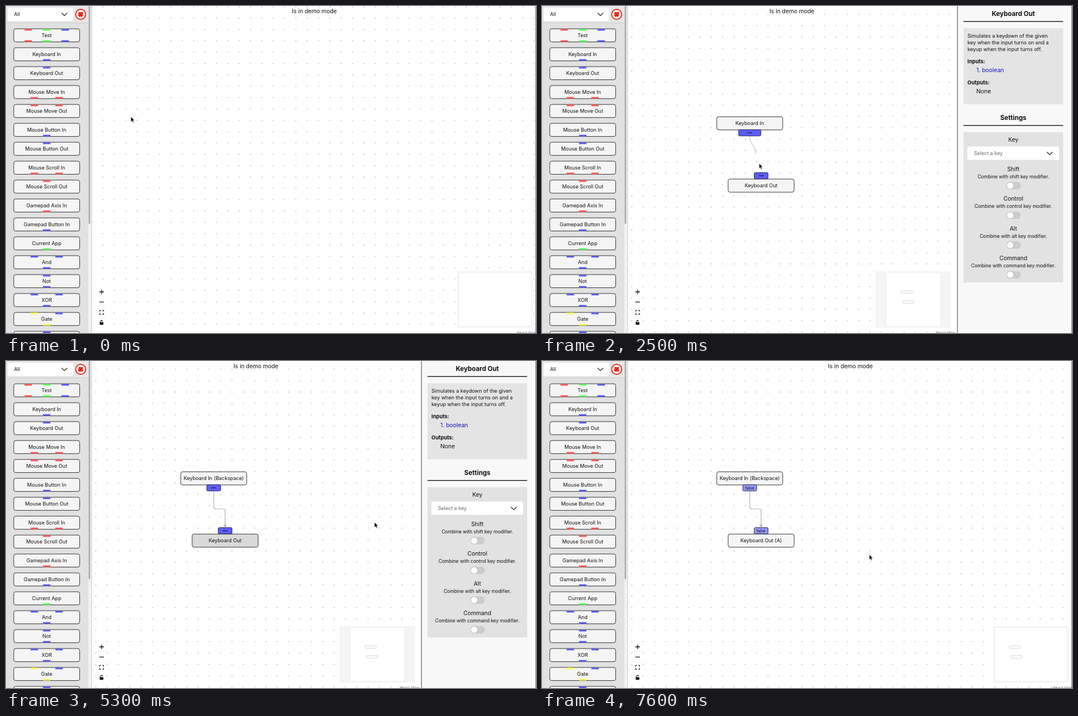
Recreate the animation shown at these times as an HTML page. Size 953x588 px, loop 7.7 s.

```html
<!DOCTYPE html>
<html lang="en">
<head>
<meta charset="utf-8">
<title>Node editor demo</title>
<style>
html, body { margin: 0; width: 100%; height: 100%; overflow: hidden; background: #fff; }
svg { display: block; width: 100%; height: 100%; font-family: Inter, "Open Sans", sans-serif; }
</style>
</head>
<body>
<svg id="stage" viewBox="0 0 953 588">
  <defs>
    <pattern id="dots" width="20.4" height="20.4" patternUnits="userSpaceOnUse">
      <circle cx="10.2" cy="10.2" r=".7" fill="#81818a"/>
    </pattern>
    <clipPath id="list"><rect x="765" y="282" width="165" height="245"/></clipPath>
  </defs>
  <g id="canvas"></g>
  <g id="sidebar"></g>
  <g id="panel"></g>
  <g id="pointer"></g>
</svg>
<script>
const LOOP = 7700, STEP = 100;
const layer = id => document.getElementById(id);
const COLORS = { r: '#fa5a5a', g: '#5aff5a', b: '#5a5aee', y: '#fafa50' };
const INK = '#333';

const rect = (x, y, w, h, fill, extra = '') =>
  `<rect x="${x}" y="${y}" width="${w}" height="${h}" fill="${fill}" ${extra}/>`;
const text = (s, x, y, size, { anchor = 'middle', weight = 400, fill = '#111' } = {}) =>
  `<text x="${x}" y="${y + size * 0.36}" font-size="${size}" text-anchor="${anchor}" font-weight="${weight}" fill="${fill}">${s}</text>`;
const left = (s, x, y, size, opts = {}) => text(s, x, y, size, { ...opts, anchor: 'start' });
const line = (d, stroke, width, extra = '') =>
  `<path d="${d}" fill="none" stroke="${stroke}" stroke-width="${width}" ${extra}/>`;
const chevron = (x, y) => line(`M${x - 5} ${y - 2.5}l5 5 5-5`, '#222', 1.2);

// Sidebar: label, top sockets, bottom sockets
const BLOCKS = [
  ['Test', 'rgb', 'rgb'], ['Keyboard In', '', 'b'], ['Keyboard Out', 'b', ''],
  ['Mouse Move In', '', 'rr'], ['Mouse Move Out', 'rr', ''],
  ['Mouse Button In', '', 'b'], ['Mouse Button Out', 'b', ''],
  ['Mouse Scroll In', '', 'rr'], ['Mouse Scroll Out', 'r', ''],
  ['Gamepad Axis In', '', 'r'], ['Gamepad Button In', '', 'b'],
  ['Current App', '', 'g'], ['And', 'bb', 'b'], ['Not', 'b', 'b'],
  ['XOR', 'bb', 'b'], ['Gate', 'yb', 'y'], ['', 'b', '']
];

const box = (label, x, y, fill = '#f5f5f5') =>
  rect(x - 59.3, y - 11.8, 118.6, 23.6, fill, `rx="3.5" stroke="${INK}"`) + text(label, x, y + 0.2, 9.15);

const sockets = (kinds, x, y) => [...kinds].map((k, i) =>
  rect(x - 73.2 + 133 * (i + 1) / (kinds.length + 1), y - 1.5, 13.4, 3, COLORS[k])).join('');

const block = ([label, top, bottom], x, y) =>
  box(label, x, y) + sockets(top, x, y - 10) + sockets(bottom, x, y + 10.3);

function drawSidebar() {
  layer('sidebar').innerHTML =
    rect(0, 0, 148, 588, '#e1e1e1') + rect(148, 0, 5.5, 588, '#f1f1f1') +
    line('M154 0V588', '#c4c4c4', 1) + rect(148.6, 0, 2.8, 392, '#a9a9a9', 'rx="1.4"') +
    BLOCKS.map((b, i) => block(b, 73.2, 52.8 + 34 * i)).join('') +
    rect(0, 0, 148, 30, '#e6e6e6') + line('M0 30.3H148', '#cfcfcf', 1) +
    rect(3, 3, 118, 24, '#fff', 'rx="3"') + left('All', 14.5, 15.2, 9.15) + chevron(105, 15) +
    `<circle cx="134.3" cy="15" r="9" fill="#fff" stroke="#ec2a1c" stroke-width="1.9"/>` +
    rect(130.2, 10.9, 8.2, 8.2, '#ec2a1c', 'rx="1"');
}

// Pointer tip: time, x, y
const PATH = [
  [0, 224.5, 199], [200, 120, 130], [300, 74, 89], [400, 150, 110], [600, 366, 177],
  [800, 190, 211], [1000, 95, 135], [1200, 74, 122], [1500, 76, 123], [1600, 125, 146],
  [1700, 230, 205], [1900, 386.5, 289], [2000, 400, 300], [2200, 407.5, 334],
  [2400, 374, 229], [2500, 390.5, 283], [2600, 394, 304], [2800, 394, 304],
  [3200, 376, 213], [3300, 374, 212], [3700, 835, 270], [3800, 857.5, 276],
  [3900, 857, 276], [4100, 825, 343], [4400, 825, 343], [4600, 709.5, 318],
  [4900, 404, 323], [5000, 404, 323], [5500, 835, 268], [5700, 840, 268],
  [5800, 804.5, 293], [5900, 804.5, 293], [6100, 588.5, 348], [LOOP, 588.5, 348]
];
const DRAGS = [[300, 600, 1], [1500, 1900, 2]];

function track(t) {
  const i = Math.max(1, PATH.findIndex(p => p[0] > t));
  const [t0, x0, y0] = PATH[i - 1], [t1, x1, y1] = PATH[i];
  const k = (t - t0) / (t1 - t0);
  return [x0 + (x1 - x0) * k, y0 + (y1 - y0) * k];
}
const between = (t, a, b) => t >= a && t < b;
const ramp = (t, a, b) => Math.min(1, Math.max(0, (t - a) / (b - a)));

function handle(x, y, width, value) {
  const label = value ? text(value, x, y, 7) : line(`M${x - 4.5} ${y}h9`, '#161640', 1.2);
  return rect(x - width / 2, y - 5.7, width, 11.4, value ? '#9696f4' : '#5d5dfa', 'rx="2.3" stroke="#2a2a55"') + label;
}

function controls() {
  const icons =
    line('M168 514h8M172 510v8M168 532.3h8', '#111', 1.3) +
    line('M168.5 549.5v-2.3h2.3M173.2 547.2h2.3v2.3M175.5 552.2v2.3h-2.3M170.8 554.5h-2.3v-2.3', '#111', 1.1) +
    rect(168.5, 568.5, 6.6, 4.8, '#111', 'rx=".8"') + line('M170 569v-1.8a1.8 1.8 0 0 1 3.6 0', '#111', 1.1);
  return rect(162.5, 505, 18.5, 73.5, '#fff') +
    [523, 541.5, 560].map(y => line(`M162.5 ${y}h18.5`, '#eee', 0.7)).join('') + icons;
}

function minimap(open, nodes, pan) {
  const x = open ? 600 : 811.5;
  const view = open ? [620, 96] : [815, 128];
  const dx = open ? 0 : 194.5;
  return rect(x, 477, 135.5, 101.5, '#f4f5f5') + rect(view[0], 480, view[1], 95, '#fff') +
    nodes.map(n => rect(644.2 + dx + (n.x - 366) * 0.165, 506.6 + (n.y - 177) * 0.16, 20, 4.4,
      '#fff', 'stroke="#d6d6d6" rx=".7"')).join('');
}

function drawCanvas(t, open) {
  const p = ramp(t, 2000, 2200), pan = [7.5 * p, 34 * p];
  const pattern = layer('dots');
  pattern.setAttribute('x', 164.2 + pan[0]);
  pattern.setAttribute('y', -8.8 + pan[1]);

  const source = { x: 366 + pan[0], y: 177 + pan[1] };
  const target = { x: 386.5 + pan[0], y: 289 + pan[1] };
  const nodes = [];
  let out = rect(154, 0, 799, 588, 'url(#dots)');
  const live = t >= 6900 && (between(t, 7200, 7300) || between(t, 7400, 7600) ? 'true' : 'false');

  if (between(t, 2400, 2600)) out += line(`M373.5 234C373.5 250 384 249 384 265.5`, '#b1b1b7', 1);
  if (t >= 2600) {
    out += line('M373.7 234V263q0 3 3 3H391q3 0 3 3V298', '#b1b1b7', 1.2) +
      '<path d="M390.8 294.5h6.4L394 299z" fill="#b1b1b7"/>';
  }
  if (t >= 600) {
    nodes.push(source);
    const label = t >= 4400 ? 'Keyboard In (Backspace)' : 'Keyboard In';
    out += box(label, source.x, source.y, between(t, 3300, 4900) ? '#d9d9d9' : undefined) +
      handle(source.x, source.y + 17, between(t, 2400, 2600) ? 40 : 25, live);
  }
  if (t >= 1900) {
    nodes.push(target);
    const label = t >= 5900 ? 'Keyboard Out (A)' : 'Keyboard Out';
    out += handle(target.x, target.y - 17.7, between(t, 2600, 2800) ? 40 : 25, live) +
      box(label, target.x, target.y, between(t, 4900, 6400) ? '#d9d9d9' : undefined);
  }
  out += text('Is in demo mode', open ? 449.3 : 554.6, 9.6, 10.3) +
    controls() + minimap(open, nodes) +
    left('React Flow', open ? 708 : 919, 587.4, 6.8, { fill: '#777' }) +
    line('M952.5 0V588', '#777', 1);
  layer('canvas').innerHTML = out;
}

const INFO = {
  in: {
    title: 'Keyboard In', inputs: 'None', outputs: '1. boolean',
    about: ['Output turns on when a given key', 'is pressed and turns off when the', 'key is released.']
  },
  out: {
    title: 'Keyboard Out', inputs: '1. boolean', outputs: 'None',
    about: ['Simulates a keydown of the given', 'key when the input turns on and a', 'keyup when the input turns off.']
  }
};
const OPTIONS = [...'abcdefghijklmnopqrstuvwxyz0123456789',
  'Backspace', 'Delete', 'Enter', 'Tab', 'Escape', 'Up', 'Down', 'Right', 'Left', 'Home', 'End'];

const port = s => left(s, 781, 0, 10.4, { fill: s === 'None' ? '#111' : '#1414c8' });
const at = (y, content) => `<g transform="translate(0 ${y})">${content}</g>`;

function toggle(name, y) {
  return text(name, 847.5, y, 10.3) +
    text(`Combine with ${name.toLowerCase()} key modifier.`, 847.5, y + 13.7, 8.5) +
    rect(834.5, y + 23, 26.5, 13.4, '#ccc', 'rx="6.7"') +
    `<circle cx="841.8" cy="${y + 29.7}" r="5.5" fill="#fff"/>`;
}

function dropdown(scroll, hoverY) {
  let rows = '';
  OPTIONS.forEach((name, i) => {
    const y = 294.7 + 25.1 * i - scroll;
    if (y < 265 || y > 545) return;
    if (Math.abs(hoverY - y) < 12.5) rows += rect(765, y - 12.5, 160, 25, '#deebf3');
    rows += left(name, 776, y + 0.3, 9.15) + line(`M765 ${y + 12.5}H924`, '#e8e8e8', 0.8);
  });
  return rect(765, 282, 165, 245, '#fff', 'stroke="#ddd" stroke-width=".7"') +
    `<g clip-path="url(#list)">${rows}</g>` +
    rect(925.8, 284 + scroll * 0.086, 3, 21.5, '#b8b8b8', 'rx="1.5"');
}

function drawPanel(t, open, hoverY) {
  if (!open) { layer('panel').innerHTML = ''; return; }
  const isIn = t < 1500 || between(t, 3300, 4900);
  const info = INFO[isIn ? 'in' : 'out'];
  const chosen = isIn ? (t >= 4400 && 'Backspace') : (t >= 5900 && 'a');
  const focus = between(t, 3800, 3900) || between(t, 5500, 5700);
  const bold = { weight: 700 };
  let out = rect(747, 0, 206, 588, '#f8f8f8') + line('M747 0V588', '#858585', 1.6) +
    line('M952.5 0V588', '#777', 1) +
    text(info.title, 847.5, 14, 11.6, bold) + line('M758 27.7H937', '#222', 1.5) +
    rect(758, 40, 179, 136.5, '#e4e4e4') +
    info.about.map((s, i) => left(s, 765, 53.3 + 12.2 * i, 9.15)).join('') +
    left('Inputs:', 765, 99.7, 9.4, bold) + at(114.8, port(info.inputs)) +
    left('Outputs:', 765, 137.8, 9.4, bold) + at(153, port(info.outputs)) +
    text('Settings', 847.5, 200.7, 11.6, bold) + line('M758 214.8H937', '#222', 1.5) +
    rect(758, 227, 179, isIn ? 344.5 : 270, '#e2e2e2') +
    text('Key', 847.5, 239.8, 10.3) +
    rect(765, 252.5, 165, 24.3, '#fff', `rx="2" ${focus ? 'stroke="#222"' : ''}`) +
    left(chosen || 'Select a key', 776.8, 264.8, 9, { fill: chosen ? '#111' : '#666' }) + chevron(913, 265);

  if (isIn) {
    const help = ['A keycode to listen for. If this is set, it', 'overrides the Key setting above. Press', 'a key to see its key code .'];
    out += text('Key Code', 847.5, 293.5, 10.3) +
      help.map((s, i) => text(s, 847.5, 307.3 + 10.7 * i, 8.5)).join('') +
      rect(796, 337.7, 104, 13.6, '#fff', 'rx="1.5" stroke="#777" stroke-width=".9"');
  }
  out += ['Shift', 'Control', 'Alt', 'Command'].map((s, i) => toggle(s, (isIn ? 368.2 : 293.3) + 53.4 * i)).join('');
  if (between(t, 3900, 4400)) out += dropdown(853 * ramp(t, 4000, 4300), hoverY);
  if (between(t, 5700, 5900)) out += dropdown(0, hoverY);
  layer('panel').innerHTML = out;
}

function drawPointer(t, [x, y]) {
  const drag = DRAGS.find(([a, b]) => between(t, a, b));
  const hand = between(t, 3800, 4400) || between(t, 5500, 5900);
  const ghost = drag ? `<g opacity=".6">${block(BLOCKS[drag[2]], x, y)}</g>` : '';
  const shape = hand
    ? '<path d="M0 .6c0-1.2 1.8-1.2 1.8 0v3.6l3.6.9c1 .3 1.3.8 1.2 1.8L6 10.2H.9L-1.9 6.6c-.6-1 .6-1.8 1.2-1L0 6.3z" fill="#fff" stroke="#111" stroke-width=".8"/>'
    : '<path d="M0 0V9.4L2.1 7.4 3.6 10.8 5.1 10.1 3.7 6.8H6.6z" stroke="#fff" stroke-width=".6"/>';
  layer('pointer').innerHTML = `${ghost}<g transform="translate(${x} ${y})">${shape}</g>`;
}

function render(t) {
  const open = between(t, 300, 6400);
  const tip = track(t);
  drawCanvas(t, open);
  drawPanel(t, open, tip[1] + 2);
  drawPointer(t, tip);
}

drawSidebar();
const start = performance.now();
let shown = -1;
function tick() {
  const t = Math.floor(((performance.now() - start) % LOOP) / STEP) * STEP;
  if (t !== shown) render(shown = t);
  requestAnimationFrame(tick);
}
tick();
</script>
</body>
</html>
```
